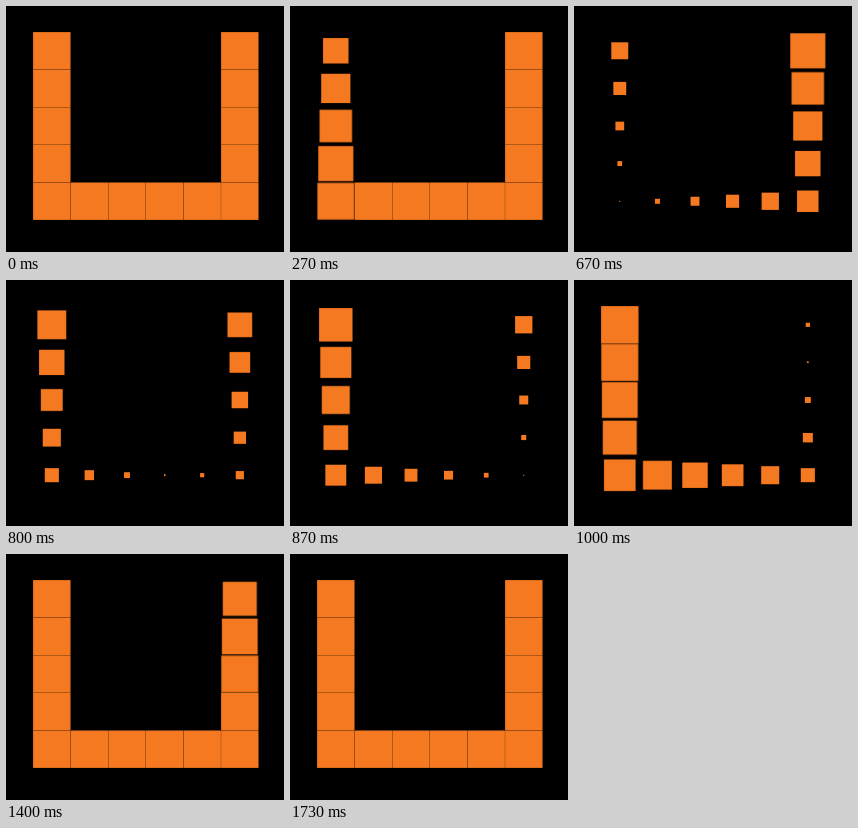
Recreate the animation shown at these times as an HTML page. Size 278 by 246 pixels, loop 1.79 s.

```html
<!DOCTYPE html>
<html lang="en">
<head>
<meta charset="utf-8">
<title>Square wave</title>
<style>
  html, body {
    margin: 0;
    width: 100%;
    height: 100%;
    overflow: hidden;
    background: #000;
  }
  svg {
    display: block;
    width: 278px;
    height: 246px;
  }
  rect {
    fill: #f47920;
    transform-box: fill-box;
    transform-origin: center;
    animation: pulse 1790ms calc(var(--i) * 40ms) infinite both;
  }
  @keyframes pulse {
    0% { transform: scale(1); }
    4.02% {
      transform: scale(1);
      animation-timing-function: cubic-bezier(.28, 0, .6, .55);
    }
    28.66% {
      transform: scale(.03);
      animation-timing-function: cubic-bezier(.3, .38, .65, 1);
    }
    56.03%, 100% { transform: scale(1); }
  }
</style>
</head>
<body>
<svg viewBox="0 0 278 246"></svg>
<script>
  const svg = document.querySelector('svg');
  const pitch = 37.6, size = 37.4;

  // The path runs down the left side, along the bottom and up the right side.
  for (let i = 0; i < 14; i++) {
    const col = Math.min(Math.max(i - 4, 0), 5);
    const row = Math.min(i, 4, 13 - i);
    const cell = document.createElementNS('http://www.w3.org/2000/svg', 'rect');
    cell.setAttribute('x', 27.1 + col * pitch);
    cell.setAttribute('y', 26.1 + row * pitch);
    cell.setAttribute('width', size);
    cell.setAttribute('height', size);
    cell.style.setProperty('--i', i);
    svg.append(cell);
  }
</script>
</body>
</html>
```
